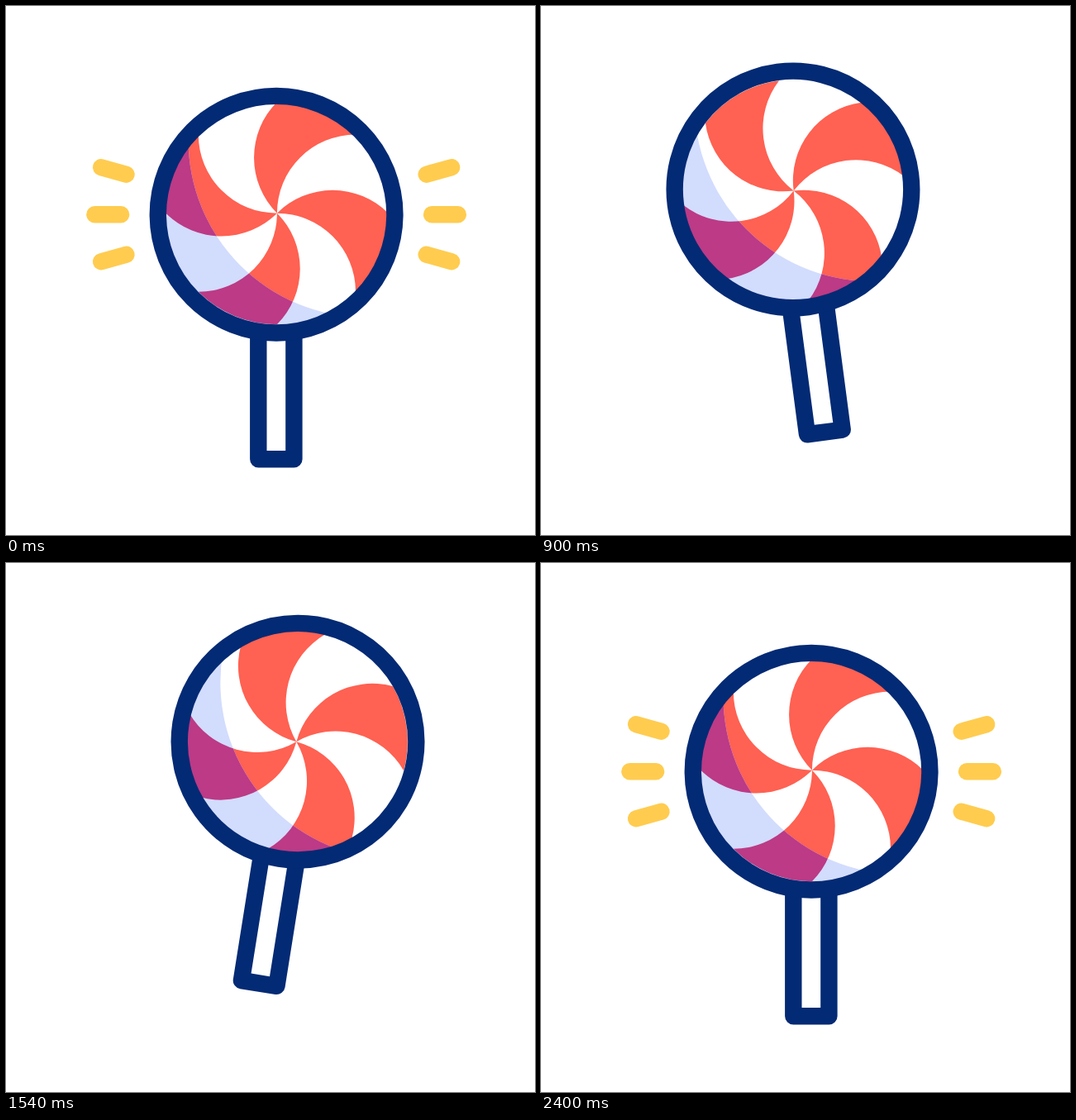
Write an HTML page that moves like this. It is 640 px wide and 640 px high and loops after 2.42 s.

```html
<!DOCTYPE html>
<html lang="en">
<head>
<meta charset="utf-8">
<title>Lollipop</title>
<style>
  html, body { margin: 0; width: 100%; height: 100%; overflow: hidden; background: #fff; }
  svg { display: block; width: 100%; height: 100%; }
</style>
</head>
<body>
<svg viewBox="0 0 640 640">
  <defs>
    <path id="swirl"/>
    <clipPath id="shade">
      <path clip-rule="evenodd" d="M-400 -400H400V400H-400Z M-106.5 -90a214.5 214.5 0 1 0 429 0a214.5 214.5 0 1 0 -429 0Z"/>
    </clipPath>
  </defs>
  <g id="pop">
    <g id="sparks" stroke="#ffcc4f" stroke-width="20.4" stroke-linecap="round"></g>
    <path d="M-21.8 130V296H21.3V130Z" fill="#fff" stroke="#032a74" stroke-width="20.4" stroke-linejoin="round"/>
    <circle r="140" fill="#fff"/>
    <use class="wheel" href="#swirl" fill="#ff6152"/>
    <g clip-path="url(#shade)">
      <circle r="140" fill="#d2dcfd"/>
      <use class="wheel" href="#swirl" fill="#bc3a86"/>
    </g>
    <circle r="143.3" fill="none" stroke="#032a74" stroke-width="20.4"/>
  </g>
</svg>
<script>
const LOOP = 2420, CYCLE = 2400, STEP = 20, TRIM = 250;
const HOME = [327.1, 252.2];
const RIM = 134.5;

const $ = s => document.querySelector(s);
const ease = u => (1 - Math.cos(Math.PI * u)) / 2;
const clamp = u => Math.min(1, Math.max(0, u));
const blend = (e, k) => k * e + (1 - k) * e * e;

// Four stripes, each edged by quarter arcs running from hub to rim
function swirlPath() {
  const at = deg => {
    const a = deg * Math.PI / 180;
    return `${RIM * Math.cos(a)} ${RIM * Math.sin(a)}`;
  };
  const r = RIM / Math.SQRT2;
  return [0, 90, 180, 270].map(d =>
    `M0 0A${r} ${r} 0 0 1 ${at(d)}A${RIM} ${RIM} 0 0 1 ${at(d + 45)}A${r} ${r} 0 0 0 0 0Z`
  ).join('');
}
$('#swirl').setAttribute('d', swirlPath());

// Each spark: inner end, then outer end
const sparks = [];
for (const side of [-1, 1]) {
  sparks.push([side * 188, 0, side * 219.7, 0]);
  for (const v of [-1, 1]) sparks.push([side * 181.6, v * 48.5, side * 212, v * 57]);
}
const lines = sparks.map(() => {
  const line = document.createElementNS('http://www.w3.org/2000/svg', 'line');
  $('#sparks').append(line);
  return line;
});
const wheels = document.querySelectorAll('.wheel');

function drawSparks(t) {
  const from = ease(clamp(t / TRIM));
  const to = ease(clamp((t - CYCLE + TRIM) / TRIM));
  const leaving = t < CYCLE / 2;
  const a = leaving ? from : 0, b = leaving ? 1 : to;
  $('#sparks').setAttribute('visibility', b > a ? 'visible' : 'hidden');
  sparks.forEach(([x1, y1, x2, y2], i) => {
    const set = (n, v) => lines[i].setAttribute(n, v);
    set('x1', x1 + (x2 - x1) * a);
    set('y1', y1 + (y2 - y1) * a);
    set('x2', x1 + (x2 - x1) * b);
    set('y2', y1 + (y2 - y1) * b);
  });
}

function draw(ms) {
  const t = Math.min(Math.floor((ms % LOOP) / STEP) * STEP, CYCLE);
  const left = t < CYCLE / 2;
  const dir = left ? -1 : 1;
  // Swing out and back once per half cycle
  const e = ease((t % (CYCLE / 2)) / (CYCLE / 4));
  const x = HOME[0] + dir * 57.5 * blend(e, left ? 0.54 : 0.36);
  const y = HOME[1] - 56.5 * blend(e, 1.14);
  $('#pop').setAttribute('transform', `translate(${x} ${y}) rotate(${dir * 15 * e})`);
  for (const w of wheels) {
    w.setAttribute('transform', `rotate(${360 * t / CYCLE}) translate(0.8 -1.5)`);
  }
  drawSparks(t);
}

const start = performance.now();
function tick() {
  draw(performance.now() - start);
  requestAnimationFrame(tick);
}

// Stripes begin at the top of the disc
draw(0);
requestAnimationFrame(tick);
</script>
</body>
</html>
```
